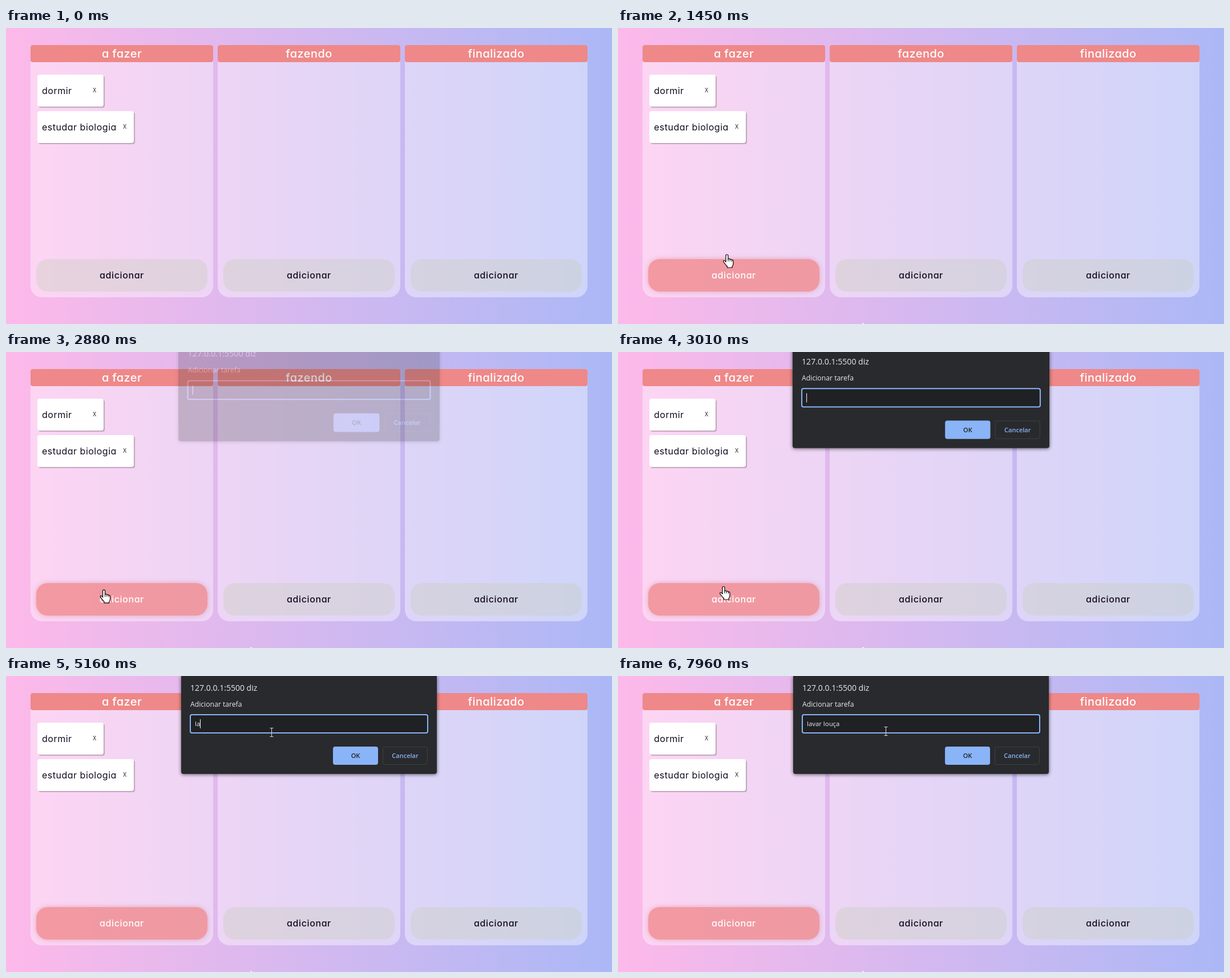
Write an HTML page that moves like this. It is 1062 px wide and 520 px high and loops after 8000 ms.

```html
<!DOCTYPE html>
<html lang="pt-BR">
<meta charset="utf-8">
<title>Quadro de tarefas</title>
<style>
html, body { margin: 0; width: 100%; height: 100%; overflow: hidden; }
#stage {
  position: relative; width: 1062px; height: 520px; overflow: hidden;
  background: linear-gradient(to right, #fdb9e9, #abb8f6);
  font: 16px Inter, "Open Sans", sans-serif; letter-spacing: .5px;
  font-feature-settings: "cv11"; color: #130a20; white-space: pre;
}
#stage div, #stage svg { position: absolute; box-sizing: border-box; }
.column { top: 30px; width: 320px; height: 443px; border-radius: 4px 4px 20px 20px; background: rgba(255,255,255,.4); }
.title { width: 320px; height: 30px; border-radius: 4px; background: #ef8888; color: #fff;
  font-size: 20px; font-weight: 500; letter-spacing: .4px; line-height: 30px; text-align: center; }
.add { left: 10px; top: 376px; width: 300px; height: 57px; border-radius: 20px;
  background: rgba(200,205,190,.4); font-weight: 500; letter-spacing: .6px; line-height: 57px; text-align: center; }
.card { left: 55px; height: 56px; padding-left: 8px; line-height: 56px; border-radius: 4px;
  background: #fff; box-shadow: 2px 2px 1px rgba(0,0,0,.22); }
.card div { top: 0; right: 13px; font: 10px/55px "Noto Sans", sans-serif; letter-spacing: 0; color: #222; }
#dialog { left: 307px; top: 0; width: 448px; height: 172px; border-radius: 0 0 4px 4px;
  background: #292a2d; box-shadow: 0 1px 6px rgba(0,0,0,.6), 0 -30px 0 #292a2d; color: #e8eaed;
  font: 12.2px/20px "Open Sans", "Noto Sans", sans-serif; letter-spacing: 0; transform-origin: 50% 0; }
#field { left: 15px; top: 67px; width: 418px; height: 34px; border: 2px solid #8ab4f8; border-radius: 4px;
  background: #202124; padding-left: 7px; font-size: 11.4px; line-height: 30px; }
#caret { display: inline-block; width: 1px; height: 16px; background: #fff; vertical-align: middle; margin-top: -2px; }
.button { top: 124px; width: 79px; height: 32px; border-radius: 4px; text-align: center; font-size: 11px; font-weight: 600; line-height: 32px; }
#cursor { left: 0; top: 0; overflow: visible; }
#speck { left: 428px; top: 518px; width: 3px; height: 2px; border-radius: 2px 2px 0 0; background: rgba(255,255,255,.8); }
</style>
<div id="stage">
  <div class="card" style="top:82px;width:116px">dormir<div>X</div></div>
  <div class="card" style="top:146px;width:169px">estudar biologia<div>X</div></div>
  <div id="speck"></div>
  <div id="dialog">
    <div style="left:16px;top:11px;font-size:14px">127.0.0.1:5500 diz</div>
    <div style="left:16px;top:40px">Adicionar tarefa</div>
    <div id="field"><span id="typed"></span><span id="caret"></span></div>
    <div class="button" style="left:266px;background:#8ab4f8;color:#202124">OK</div>
    <div class="button" style="left:353px;border:1px solid #3c4043;line-height:30px;color:#8ab4f8">Cancelar</div>
  </div>
  <svg id="cursor" width="1" height="1" stroke-linejoin="round">
    <g id="arrow" fill="#fff" stroke="#000">
      <path d="M0 0V17L4 13.3 6.5 19 9 18 6.5 12.3H12Z"/>
    </g>
    <g id="hand" fill="#fff" stroke="#000" stroke-width="1.2" transform="translate(-7 -1)">
      <path d="M5 14V3Q5 1 7 1T9 3V9Q11 7.5 12.3 9.5 14.5 8.5 15.5 10.5 18 10 18 12.5V17Q18 20 16 22V24H7.5V22Q4 18 1 14 0 11.5 2 11.5 4 12 5 14Z"/>
      <path d="M9 8V13M12.3 9.5V13M15.5 10.5V13.5" fill="none" stroke-width="1"/>
    </g>
    <g id="beam" fill="none">
      <path id="beamPath" d="M-3-7.5H3M0-7.5V7.5M-3 7.5H3" stroke="#d8d8d8"/>
    </g>
  </svg>
</div>
<script>
const LOOP = 8000;
const $ = id => document.getElementById(id);
const stage = $('stage');

['a fazer', 'fazendo', 'finalizado'].reverse().forEach((name, i) => {
  const column = document.createElement('div');
  column.className = 'column';
  column.style.left = 699 - 328 * i + 'px';
  column.innerHTML = `<div class="title">${name}</div><div class="add">adicionar</div>`;
  stage.prepend(column);
});
const firstAdd = stage.querySelector('.add');

// [time, x, y] of the pointer tip
const path = [
  [380, 429, 517], [520, 340, 420], [640, 235, 270], [760, 165, 138], [880, 140, 220],
  [1000, 140, 380], [1130, 155, 432], [1300, 178, 432], [1450, 191, 398], [1540, 191, 398],
  [1660, 188, 180], [1780, 178, 82], [1860, 172, 130], [1980, 167, 284], [2050, 166, 330],
  [2120, 165, 385], [2190, 164, 424], [2260, 164, 424], [2400, 158, 424], [2750, 158, 424],
  [3010, 185, 412], [3080, 185, 412], [3250, 310, 250], [3400, 430, 125], [3490, 465.5, 99],
  [7819, 465.5, 99], [7820, 465.5, 97], [7959, 465.5, 97], [7960, 469.5, 97]
];
const pointerKinds = [[380, 'arrow'], [1010, 'hand'], [1560, 'arrow'], [2110, 'hand'], [3100, 'arrow'], [3400, 'beam']];
const text = 'lavar louça';
const keyTimes = [5100, 5160, 5360, 5560, 5750, 6090, 6310, 6510, 6640, 7170, 7300];
const caretShown = [[2800, 3420], [3950, 4480], [5030, 7820]];

const clamp = v => Math.max(0, Math.min(1, v));
const mix = (a, b, p) => a + (b - a) * p;
const rgba = (a, b, p) => `rgba(${a.map((v, i) => mix(v, b[i], p)).join()})`;
const ramp = (t, start, length) => clamp((t - start) / length);

function pointerAt(t) {
  const next = path.findIndex(k => k[0] > t);
  if (next < 1) return path[next ? path.length - 1 : 0].slice(1);
  const [a, b] = [path[next - 1], path[next]];
  const p = ramp(t, a[0], b[0] - a[0]);
  return [mix(a[1], b[1], p), mix(a[2], b[2], p)];
}

function drawButton(t) {
  const hover = ramp(t, 1010, 300) - ramp(t, 1540, 300) + ramp(t, 2110, 280);
  firstAdd.style.background = rgba([200, 205, 190, .4], [240, 128, 128, .7], hover);
  firstAdd.style.color = rgba([19, 10, 32, 1], [255, 255, 255, 1], hover);
  firstAdd.style.boxShadow = `0 0 8px rgba(200,100,120,${.4 * hover})`;
}

function drawDialog(t) {
  const p = ramp(t, 2850, 350);
  const rest = (1 - p) ** 3;
  $('dialog').style.opacity = clamp(p * 2.5);
  $('dialog').style.transform = rest ? `translateY(${-25 * rest}px) scale(${1 + .028 * rest})` : 'none';
  $('typed').textContent = text.slice(0, keyTimes.filter(k => k <= t).length);
  $('caret').style.opacity = +caretShown.some(([on, off]) => t >= on && t < off);
}

function drawPointer(t) {
  const current = pointerKinds.filter(k => k[0] <= t).pop();
  for (const kind of ['arrow', 'hand', 'beam']) {
    $(kind).style.display = current && current[1] === kind ? '' : 'none';
  }
  const [x, y] = pointerAt(t);
  $('cursor').style.transform = `translate(${x}px,${y}px)`;
  $('speck').style.opacity = +(t >= 380);
}

function draw() {
  const t = performance.now() % LOOP;
  drawButton(t);
  drawDialog(t);
  drawPointer(t);
  requestAnimationFrame(draw);
}
draw();
</script>
</html>
```
